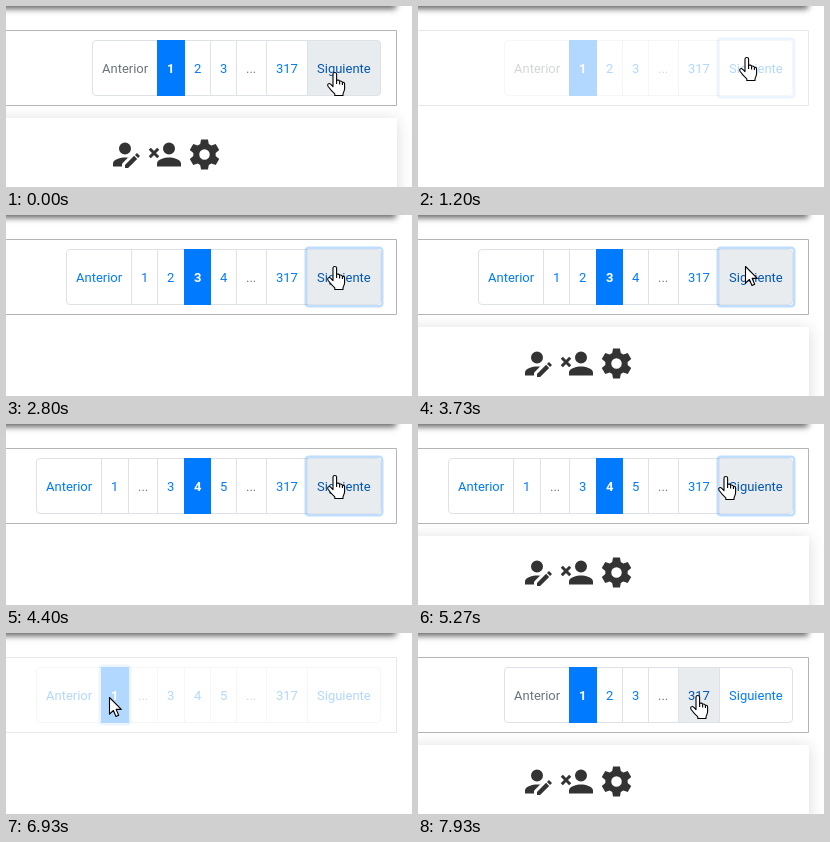
Recreate the animation shown at these times as an HTML page with a canvas. Size 406x181 px, loop 8 s.

```html
<!DOCTYPE html>
<html lang="es">
<meta charset="utf-8">
<style>
html, body { margin: 0; width: 406px; height: 181px; overflow: hidden; background: #fff }
canvas { display: block }
</style>
<canvas width="406" height="181"></canvas>
<script>
const ctx = document.querySelector('canvas').getContext('2d');
const FPS = 15, FRAMES = 120;
const BLUE = '#007bff', LINE = '#dee2e6';

// Times are in ticks: the pager dims at `dim` and shows `page` at `refresh`
const loads = [
  { dim: -20, refresh: -10, page: 1, target: '' },
  { dim: 10, refresh: 19, page: 2, target: 'Siguiente' },
  { dim: 33, refresh: 42, page: 3, target: 'Siguiente' },
  { dim: 57, refresh: 66, page: 4, target: 'Siguiente' },
  { dim: 102, refresh: 112, page: 1, target: '1' }
];
const moves = [
  { from: 0, to: 5, x: 327, y: 51 },
  { from: 78, to: 86, x: 99, y: 64 },
  { from: 89, to: 91, x: 103, y: 64 },
  { from: 113, to: 119, x: 278, y: 62 }
];

const person = new Path2D('M12 4a4 4 0 0 1 0 8 4 4 0 0 1 0-8ZM12 14c2.67 0 8 1.33 8 4v2H4v-2c0-2.67 5.33-4 8-4Z');
const cutout = new Path2D('M10 21V18.1L14.1 14H24V21Z');
const pencil = new Path2D('M12 21V18.94L18.06 12.88 20.11 14.93 14.06 21ZM18.65 12.3L20 11 22 13 20.7 14.35Z');
const cross = new Path2D('M2.2 8.2L7.8 13.8M7.8 8.2L2.2 13.8');
const gear = makeGear();
const arrow = new Path2D('M.5 .5V17.2L4.4 13.5 7 19.5 9.7 18.3 7.1 12.4H12.3Z');
const hand = new Path2D('M0 2C0 0 3.6 0 3.6 2V8.6C4.6 7.6 6.4 8 6.6 9.4 7.6 8.6 9.2 9.2 9.4 10.5 10.4 9.8 11.6 10.6 11.6 12V16.5C11.6 19 10.4 20.2 10 22V23.5H1.8V21.8C-.5 19.8-3 17-5 14.2-6.2 12.2-4 10.7-2.4 12.2L0 14.6Z');
const knuckles = new Path2D('M3.6 8V12M6.6 9.4V12.5M9.4 10.5V13');

function makeGear() {
  const path = new Path2D();
  for (let k = 0; k < 6; k++) {
    const c = Math.cos(k * Math.PI / 3), s = Math.sin(k * Math.PI / 3);
    for (const [x, y] of [[-2.87, -6.93], [-2.3, -10], [2.3, -10], [2.87, -6.93]])
      path.lineTo(12 + x * c - y * s, 12 + x * s + y * c);
  }
  path.closePath();
  path.moveTo(15.5, 12);
  path.arc(12, 12, 3.5, 0, 7);
  return path;
}

const clamp = v => Math.min(1, Math.max(0, v));

function pointer(n) {
  let x = 327, y = 66;
  for (const m of moves) {
    const p = clamp((n - m.from) / (m.to - m.from)) ** 1.15;
    x += (m.x - x) * p;
    y += (m.y - y) * p;
  }
  return { x: Math.round(x), y: Math.round(y) };
}

function stateAt(n) {
  const i = loads.findLastIndex(l => l.dim - 1 <= n);
  const load = loads[i], busy = n < load.refresh, dimmed = busy && n >= load.dim;
  const { page } = busy ? loads[i - 1] : load;
  const focus = !busy && page === 1 ? '' : load.target;
  return {
    page, focus,
    active: focus === '1' ? '1' : String(page),
    pager: dimmed ? .3 : 1,
    card: dimmed ? .3 * clamp(1 - (n - load.dim) / 2) : busy ? 1 : clamp((n - load.refresh - 2) / 2),
    cursor: n < load.refresh - 1 ? arrow : hand
  };
}

function box(color, x, y, w, h) {
  ctx.fillStyle = color;
  ctx.fillRect(x, y, w, h);
}

function outline(color, width, x, y, w, h, radius) {
  ctx.strokeStyle = color;
  ctx.lineWidth = width;
  ctx.beginPath();
  ctx.roundRect(x, y, w, h, radius);
  ctx.stroke();
}

function veil(opacity, y, h) {
  box(`rgba(255,255,255,${1 - opacity})`, 0, y, 406, h);
}

function shadowBox(color, blur, dy, ...rect) {
  ctx.save();
  ctx.shadowColor = color;
  ctx.shadowBlur = blur;
  ctx.shadowOffsetY = dy;
  box('#fff', ...rect);
  ctx.restore();
}

function at(x, y, scale, paint) {
  ctx.save();
  ctx.translate(x, y);
  ctx.scale(scale, scale);
  paint();
  ctx.restore();
}

function fill(path, color = '#333') {
  ctx.fillStyle = color;
  ctx.fill(path, 'evenodd');
}

function drawCard(opacity) {
  shadowBox('rgba(0,0,0,.15)', 15, 2, -30, 112, 421, 100);
  at(101, 130.5, 1.5, () => {
    fill(person);
    fill(cutout, '#fff');
    fill(pencil);
  });
  at(145, 130.5, 1.5, () => fill(person));
  at(140.5, 130.5, 1.5, () => {
    ctx.strokeStyle = '#333';
    ctx.lineWidth = 2;
    ctx.stroke(cross);
  });
  at(180.5, 130.5, 1.5, () => fill(gear));
  veil(opacity, 90, 91);
}

function labelsFor(page) {
  const labels = page > 3 ? ['Anterior', '1', '...'] : ['Anterior'];
  for (let i = page > 3 ? page - 1 : 1; i <= Math.max(3, page + 1); i++) labels.push(String(i));
  return [...labels, '...', '317', 'Siguiente'];
}

// Cells share a one pixel border and are packed from the right edge
function layout(page) {
  let left = 374.2, end = 374;
  ctx.font = '13px Roboto, sans-serif';
  return labelsFor(page).reverse().map(label => {
    left -= ctx.measureText(label).width + 19.1;
    const x = Math.floor(left), w = end - x + 1;
    end = x;
    return { label, x, w };
  }).reverse();
}

function drawPager({ page, focus, active, pager }, mouseX) {
  const cells = layout(page), left = cells[0].x;
  outline('#b4b4b4', 1, -5.5, 24.5, 396, 75, 0);

  for (const { label, x, w } of cells) {
    const off = label === '...' || label === 'Anterior' && page === 1;
    const on = label === active;
    const hover = !off && !on && pager === 1 && mouseX >= x && mouseX < x + w - 1;
    if (hover) box('#e9ecef', x, 35, w - 1, 54);
    if (x > left) box(LINE, x, 34, 1, 56);
    ctx.font = `${on ? 700 : 400} 13px Roboto, sans-serif`;
    ctx.fillStyle = off ? '#6c757d' : hover ? '#0056b3' : BLUE;
    ctx.fillText(label, x + 10, 67);
  }
  outline(LINE, 1, left + .5, 34.5, 374 - left, 55, 3.5);

  const lit = cells.find(c => c.label === active);
  box(BLUE, lit.x, 34, lit.w, 56);
  ctx.font = '700 13px Roboto, sans-serif';
  ctx.fillStyle = '#fff';
  ctx.fillText(active, lit.x + 10, 67);

  const ring = cells.find(c => c.label === focus);
  if (ring) outline('rgba(0,123,255,.25)', 2.5, ring.x - 1.25, 32.75, ring.w + 2.5, 58.5, 3);
  veil(pager, 24, 76);
}

function drawCursor(path, { x, y }) {
  at(x, y, 1, () => {
    ctx.strokeStyle = '#000';
    ctx.lineWidth = 1.1;
    ctx.lineJoin = 'round';
    fill(path, '#fff');
    ctx.stroke(path);
    if (path === hand) ctx.stroke(knuckles);
  });
}

function draw(now) {
  const n = Math.floor((now + 5) * FPS / 1000) % FRAMES;
  const state = stateAt(n), mouse = pointer(n);
  box('#fff', 0, 0, 406, 181);
  drawCard(state.card);
  shadowBox('rgba(0,0,0,.6)', 6, 3, -30, -40, 420, 40);
  drawPager(state, mouse.x);
  drawCursor(state.cursor, mouse);
}

const start = performance.now();
(function tick() {
  draw(performance.now() - start);
  requestAnimationFrame(tick);
})();
</script>
</html>
```
